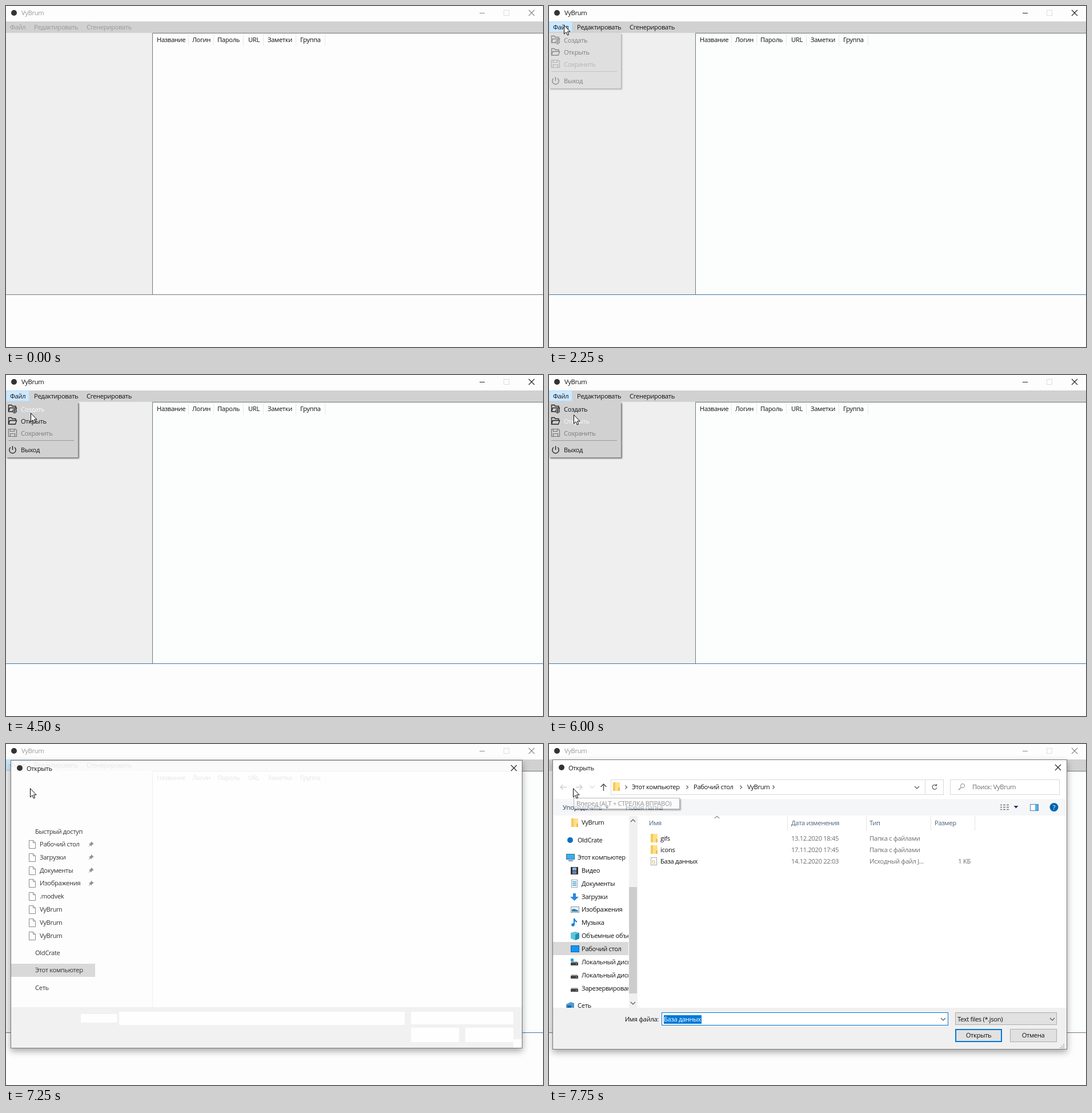
An HTML page that plays this animation: 940x596 px, repeating every 8 s.

```html
<!DOCTYPE html>
<html lang="ru">
<head>
<meta charset="utf-8">
<style>
html, body { margin: 0; width: 100%; height: 100%; overflow: hidden; background: #fdfdfd; }
svg { display: block; }
text { font: 11.2px "Open Sans", "Noto Sans", sans-serif; letter-spacing: -.34px; white-space: pre; }
.shadow { filter: drop-shadow(0 5px 6px rgba(0, 0, 0, .33)); }
.menu { filter: drop-shadow(2px 2px 1px rgba(0, 0, 0, .5)); }
</style>
</head>
<body>
<svg id="stage" width="940" height="596"></svg>
<script>
const LOOP = 8000, STEP = 250;
const APP = 'VyBrum', CLOUD = 'OldCrate';
const BLUE = '#0078d7';

// Pointer stops: [start time, x, y]
const stops = [
  [1000, 262, 356], [1250, 115, 159], [1500, 43, 51], [1750, 20, 20], [2000, 26, 33],
  [2750, 32, 51], [3250, 32, 55], [3500, 47, 71], [3750, 47, 70], [4000, 41, 64],
  [4250, 41, 63], [4500, 43, 66], [6000, 43, 69], [6250, 42, 77]
];

const text = (x, y, s, fill = '#111', extra = '') => `<text x="${x}" y="${y}" fill="${fill}" ${extra}>${s}</text>`;
const rect = (x, y, w, h, fill, extra = '') => `<rect x="${x}" y="${y}" width="${w}" height="${h}" fill="${fill}" ${extra}/>`;
const box = (x, y, w, h, fill, stroke, extra = '') => rect(x + .5, y + .5, w - 1, h - 1, fill, `stroke="${stroke}" ${extra}`);
const line = (d, stroke, w = 1, extra = '') => `<path d="${d}" fill="none" stroke="${stroke}" stroke-width="${w}" ${extra}/>`;
const dot = (x, y, r, fill) => `<circle cx="${x}" cy="${y}" r="${r}" fill="${fill}"/>`;
const shape = (d, fill) => `<path d="${d}" fill="${fill}"/>`;
const cross = (x, y, c) => line(`M${x - 5} ${y - 5}l10 10m0-10l-10 10`, c, 1.1);
const down = (x, y, c = '#555') => line(`M${x - 4} ${y - 2}l4 4 4-4`, c, 1.2);
const up = (x, y, c = '#555') => line(`M${x - 4} ${y + 2}l4-4 4 4`, c, 1.2);
const right = (x, y) => line(`M${x - 1.5} ${y - 3}l3 3-3 3`, '#555', 1.1);
const folder = (x, y) => rect(x, y, 12, 15, '#ffe08a') + rect(x, y, 4, 15, '#f5c95b') + rect(x + 9, y + 9, 3, 6, '#efbd4c');
const page = (x, y) => line(`M${x + .5} ${y + .5}h7l4 4v10h-11zm7 0v4h4`, '#8a8a8a');

function mainWindow(t) {
  const active = t >= 2250 && t < 7000, used = t >= 2250;
  const title = active ? '#111' : '#999', menu = used ? '#111' : '#999';
  const control = active ? '#222' : '#888';
  const hover = t >= 2000 && t < 7500;
  const bottomLine = used && t < 7500 ? '#3c78a8' : '#777';
  const heads = [[264, 'Название', 319], [326, 'Логин', 363], [370, 'Пароль', 415],
    [424, 'URL', 450], [458, 'Заметки', 507], [515, 'Группа', 558]];
  return rect(0, 0, 940, 596, '#fdfdfd') + rect(0, 27, 940, 20, '#d1d1d1') +
    rect(0, 47, 256, 457, '#efefef') + rect(257, 48, 683, 456, used ? '#fbfefd' : '#fdfdfd') +
    (hover ? box(0, 27, 41, 19, '#cce8ff', '#b4dcf8') : '') +
    dot(14, 12, 5, '#333') + text(27, 16, APP, title) +
    line('M829 12.5h9', control) + box(871, 7, 10, 10, 'none', '#ddd') + cross(920, 12, control) +
    text(7, 41, 'Файл', menu) + text(49, 41, 'Редактировать', menu) + text(141, 41, 'Сгенерировать', menu) +
    line('M940 47.5H256.5V504', '#777') + line('M0 504.5h940', bottomLine) +
    heads.map(([x, s, end]) => text(x, 63, s) + line(`M${end + .5} 49v20`, '#e8e8e8')).join('');
}

function fileMenu(t) {
  if (t < 2250 || t >= 6750) return '';
  const second = t >= 3750 && t < 4250 || t >= 6000;
  const first = t >= 3000 && !second;
  const open = (y, c) => line(`M4.5 ${y + 12}V${y + .5}h5l1.5 2h6v3M4.5 ${y + 12}l2-6.5h12l-2 6.5z`, c, 1.3);
  return `<g opacity="${t < 2500 ? .5 : 1}">` + rect(0, 47, 126, 97, '#d1d1d1', 'class="menu"') +
    open(52, '#222') + dot(15, 63, 3.5, '#d1d1d1') + line('M15 60v6m-3-3h6', '#222', 1.2) +
    `<circle cx="15" cy="63" r="3.5" fill="none" stroke="#222"/>` +
    open(74, '#222') +
    line('M4.5 94.5h12l2 2v11h-14zm3 0v4h7v-4m-7 13v-5h8v5', '#777', 1.2) +
    line('M8 126.5a5.7 5.7 0 1 0 7 0M11.5 124v7', '#222', 1.4) +
    text(26, 64, 'Создать', first ? '#fafafa' : '#111') +
    text(26, 85, 'Открыть', second ? '#fafafa' : '#111') +
    text(26, 106, 'Сохранить', '#7d7d7d') + line('M4 114.5h115', '#999') +
    text(26, 135, 'Выход') + '</g>';
}

// The window behind still shines faintly through the opening dialog
function dialogOpening(t) {
  const places = ['Рабочий стол', 'Загрузки', 'Документы', 'Изображения', '.modvek', APP, APP, APP];
  const pin = (x, y) => shape(`M${x} ${y - 5}l5 5-2 0-2 2 0 2-2-2-4 3 3-4-2-2 2 0 2-2z`, '#8a929b');
  const fields = [[131, 472, 63, 15], [198, 468, 500, 23], [709, 468, 179, 22],
    [709, 496, 84, 25], [804, 496, 84, 25], [888, 516, 15, 15]];
  return box(8, 28, 896, 504, '#fff', '#777', 'class="shadow"') +
    '<clipPath id="inside"><path d="M9 29h894v502H9z"/></clipPath>' +
    `<g clip-path="url(#inside)" opacity=".1">${mainWindow(t)}</g>` +
    rect(9, 460, 894, 71, '#f0f0f0', 'opacity=".93"') +
    fields.map(f => rect(...f, '#fff', 'opacity=".93"')).join('') +
    dot(24, 42, 5, '#333') + text(36, 47, 'Открыть') + cross(889, 42, '#222') +
    text(51, 157, 'Быстрый доступ', '#333') +
    places.map((s, i) => {
      const y = 175 + i * 22.8;
      return page(40, Math.round(y) - 7) + text(59, y + 4, s, '#333') + (i < 4 ? pin(149, y) : '');
    }).join('') +
    text(51, 369, CLOUD, '#333') + rect(9, 384, 147, 23, '#d9d9d9') +
    text(51, 399, 'Этот компьютер', '#333') + text(51, 430, 'Сеть', '#333');
}

function addressBar() {
  const crumbs = [[145, 'Этот компьютер', 242], [253, 'Рабочий стол', 336], [347, APP, 393]];
  return line('M31 75.5H20m4.5-4.5l-4.5 4.5 4.5 4.5M47 75.5h11m-4.5-4.5l4.5 4.5-4.5 4.5', '#ccc', 1.3) +
    down(75.5, 75, '#d5d5d5') + line('M95.5 82V70m-5 5l5-5 5 5', '#555', 1.5) +
    box(108, 62, 583, 27, '#fff', '#d9d9d9') + line('M658.5 62v27', '#d9d9d9') +
    folder(112, 67) + right(135, 75.5) +
    crumbs.map(([x, s, end]) => text(x, 79, s) + right(end, 75.5)).join('') + down(644, 76) +
    line('M678 72.5a4 4 0 1 0 1 3.5M678.5 70v3h-3', '#555', 1.2) +
    box(702, 62, 192, 27, '#fff', '#d9d9d9') +
    line('M721 76l-4 4.5', '#888', 1.2) + `<circle cx="724" cy="73" r="3.5" fill="none" stroke="#888"/>` +
    text(741, 79, 'Поиск: ' + APP, '#6d6d6d');
}

function toolbar() {
  const rows = [0, 1, 2].map(i => line(`M790 ${106.5 + i * 4}h3m2 0h4m2 0h4`, '#777', 1.5)).join('');
  return rect(8, 96, 897, 29, '#f5f6f7') +
    text(24, 115, 'Упорядочить', '#1e395b') + shape('M98 109h7l-3.5 4z', '#1e395b') +
    text(134, 115, 'Новая папка', '#1e395b') + rows + shape('M813.5 108h8l-4 4.5z', '#1e395b') +
    box(842, 105, 15, 12, '#fff', '#4b83b8') + rect(851, 106, 5, 10, '#5aaee8') +
    dot(884, 110.5, 7.5, '#0063b1') + text(884, 115, '?', '#fff', 'text-anchor="middle" font-weight="700"');
}

function placeIcon(i, x, y) {
  const disk = rect(x, y + 1, 13, 5, '#444') + rect(x + 1, y - 1, 11, 2, '#aaa') + rect(x + 9, y + 3, 2, 1, '#7fe07f');
  return [
    () => folder(x + 1, y - 7),
    () => dot(x + 7, y, 5, '#0a6fc8'),
    () => box(x, y - 6, 15, 10, '#35b0ee', '#386a94') + rect(x + 4, y + 5, 8, 2, '#7890a4'),
    () => rect(x, y - 6, 13, 13, '#333') + rect(x + 3, y - 5, 7, 5, '#8ab4dc') + rect(x + 3, y + 1, 7, 5, '#6882b8'),
    () => box(x + 1, y - 7, 11, 14, '#fff', '#8fa4b4') + line(`M${x + 3} ${y - 3}h7m-7 3h7m-7 3h7`, '#3b95cf', 1.3),
    () => shape(`M${x + 4} ${y - 6}h5v6h5l-7.5 7-7.5-7h5z`, '#2b88dc'),
    () => box(x, y - 5, 15, 11, '#e6f3fb', '#8895a0') + shape(`M${x + 2} ${y + 4}v-4l4-1 7 3v2z`, '#3b7f9f'),
    () => line(`M${x + 6} ${y + 4}v-11q1 4 5 6`, '#1681d8', 2) + dot(x + 4, y + 4, 2.8, '#1681d8'),
    () => shape(`M${x} ${y - 5}l8-2 7 2v10l-7 3-8-3z`, '#5dc6dc') + shape(`M${x + 8} ${y - 2}l7-3v10l-7 3z`, '#1f8fb1'),
    () => box(x, y - 6, 15, 12, '#1296f0', '#0865ae'),
    () => disk + rect(x, y - 6, 5, 5, '#20a5e8'),
    () => disk,
    () => disk,
    () => shape(`M${x} ${y - 2}l8-4 6 2v9l-7 2-7-3z`, '#4a9bd5') + rect(x + 2, y, 7, 5, '#1d66a2')
  ][i]();
}

function tree() {
  const names = [APP, CLOUD, 'Этот компьютер', 'Видео', 'Документы', 'Загрузки', 'Изображения', 'Музыка',
    'Объемные объекты', 'Рабочий стол', 'Локальный диск', 'Локальный диск', 'Зарезервировано', 'Сеть'];
  const rowY = i => i < 3 ? 137 + i * 30.5 : i < 13 ? 198 + (i - 2) * 22.85 : 457;
  const items = names.map((s, i) => {
    const top = [1, 2, 13].includes(i), y = Math.round(rowY(i));
    return placeIcon(i, top ? 30 : 38, y) + text(top ? 50 : 57, y + 4, s);
  }).join('');
  return '<clipPath id="side"><path d="M7 126h132v335H7z"/></clipPath><g clip-path="url(#side)">' +
    rect(7, 346, 133, 23, '#d9d9d9') + items + '</g>' +
    rect(140, 126, 15, 335, '#f0f0f0') + rect(140, 250, 14, 186, '#cdcdcd') + up(147, 134) + down(147, 453);
}

function fileList() {
  const heads = [[175, 'Имя', 417], [424, 'Дата изменения', 555], [561, 'Тип', 668], [675, 'Размер', 745]];
  const files = [['gifs', '13.12.2020 18:45', 'Папка с файлами'], ['icons', '17.11.2020 17:45', 'Папка с файлами'],
    ['База данных', '14.12.2020 22:03', 'Исходный файл J...']];
  return heads.map(([x, s, end]) => text(x, 142, s, '#4c607a') + line(`M${end + .5} 126v25`, '#e5e5e5')).join('') +
    up(294, 128, '#888') +
    files.map(([name, date, kind], i) => {
      const y = 165 + i * 20;
      const icon = i < 2 ? folder(178, y - 8)
        : box(178, y - 7, 11, 14, '#fff', '#aaa') + text(180, y + 3, '{}', '#b59a2c', 'style="font-size:8px"');
      return icon + text(195, y + 4, name) + text(424, y + 4, date, '#6d6d6d') + text(561, y + 4, kind, '#6d6d6d');
    }).join('') + text(738, 209, '1 КБ', '#6d6d6d', 'text-anchor="end"');
}

function footer() {
  const middle = 'text-anchor="middle"';
  const grip = [[900, 524], [897, 527], [900, 527], [894, 530], [897, 530], [900, 530]];
  return rect(7, 461, 899, 72, '#f0f0f0') + text(192, 485, 'Имя файла:', '#111', 'text-anchor="end"') +
    box(197, 469, 502, 23, '#fff', BLUE) + rect(201, 474, 66, 15, BLUE) +
    text(201, 485, 'База данных', '#fff') + down(690, 481) +
    box(711, 469, 178, 22, '#e1e1e1', '#adadad') + text(715, 485, 'Text files (*.json)') + down(881, 481) +
    rect(712, 499, 80, 21, '#e1e1e1', `stroke="${BLUE}" stroke-width="2"`) + text(752, 513, 'Открыть', '#111', middle) +
    box(807, 498, 82, 23, '#e1e1e1', '#adadad') + text(847.5, 513, 'Отмена', '#111', middle) +
    grip.map(([x, y]) => rect(x, y, 2, 2, '#bbb')).join('');
}

function dialog(t) {
  const tip = box(43, 94, 186, 20, '#fff', '#888', 'class="menu"') +
    text(48, 108, 'Вперед (ALT + СТРЕЛКА ВПРАВО)', '#575757');
  return box(6, 27, 901, 507, '#fff', '#777', 'class="shadow"') +
    dot(22, 41, 5, '#333') + text(34, 46, 'Открыть') + cross(891, 41, '#222') +
    addressBar() + toolbar() + tree() + fileList() + footer() +
    (t >= 7750 ? `<g opacity=".6">${tip}</g>` : '');
}

function pointer(t) {
  const stop = stops.filter(s => s[0] <= t).pop();
  return stop ? `<path transform="translate(${stop[1]} ${stop[2]})" d="M.5.7v15.3l3.5-3.3 2.4 5.3 2.3-1-2.3-5.1h4.7z" fill="#fff" stroke="#000"/>` : '';
}

const stage = document.getElementById('stage');
let shown = -1;
function tick(now) {
  const t = Math.floor(now % LOOP / STEP) * STEP;
  if (t !== shown) {
    shown = t;
    const top = t >= 7500 ? dialog(t) : t >= 7250 ? dialogOpening(t) : '';
    stage.innerHTML = mainWindow(t) + fileMenu(t) + top + pointer(t);
  }
  requestAnimationFrame(tick);
}
tick(performance.now());
</script>
</body>
</html>
```
